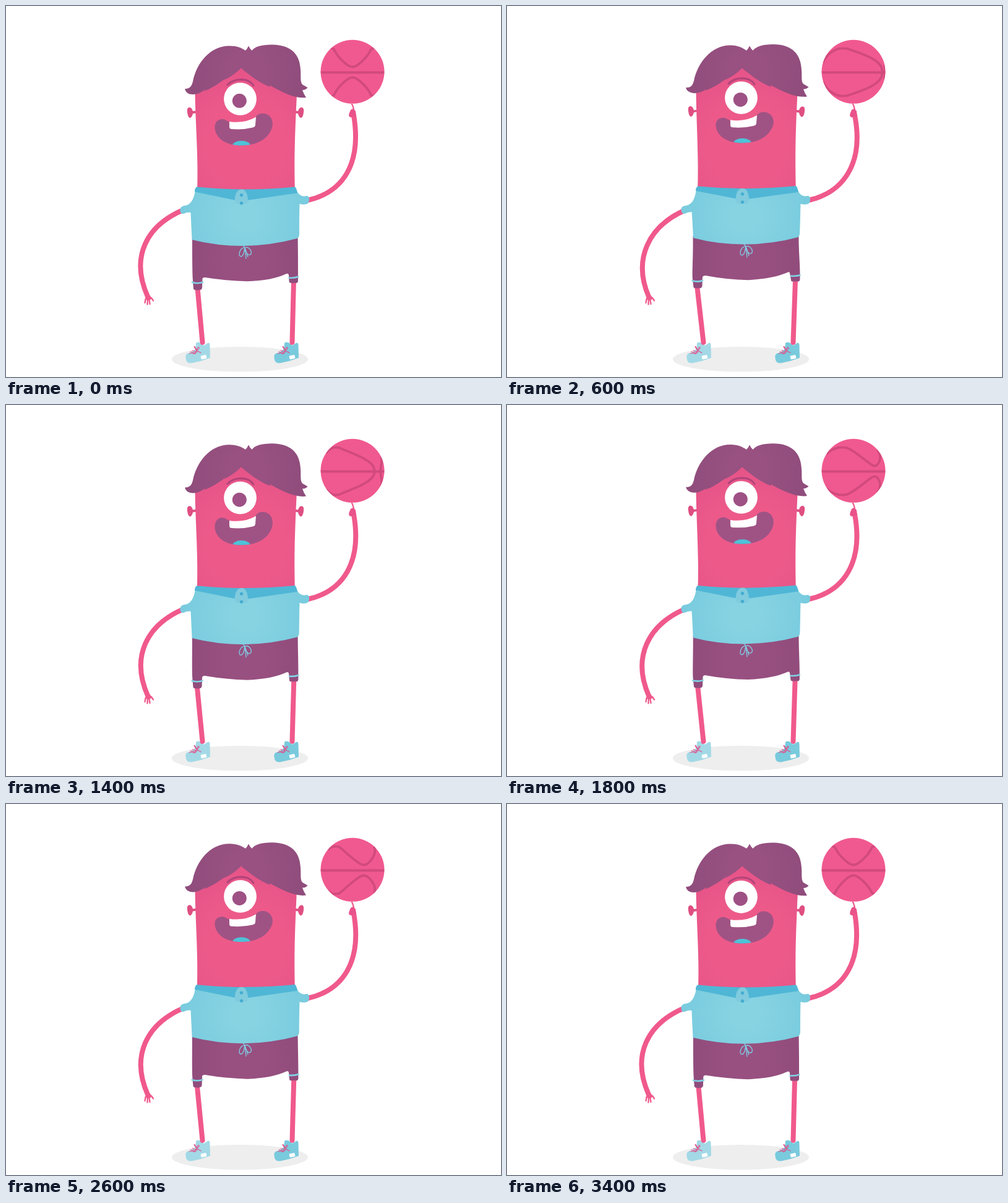
Write an HTML page that moves like this. It is 800x600 px and loops after 3.5 s.

```html
<!DOCTYPE html>
<html lang="en">
<head>
<meta charset="utf-8">
<title>Ball spinner</title>
<style>
  html, body { margin: 0; width: 100%; height: 100%; overflow: hidden; background: #fff; }
  svg { display: block; width: 100%; height: 100%; }
  .limb { fill: none; stroke: #f0598c; stroke-width: 8; stroke-linecap: round; }
  .finger { fill: none; stroke: #f0598c; stroke-width: 2.3; stroke-linecap: round; stroke-linejoin: round; }
  .seam { fill: none; stroke: #d14a7d; stroke-width: 3.8; stroke-linejoin: round; }
  .trim { fill: none; stroke: #80d3e5; stroke-width: 2.6; }
  .lace { fill: none; stroke: #e2508a; stroke-width: 1.2; stroke-linecap: round; }
</style>
</head>
<body>
<!-- In data-d, "a|b" blends from the low pose to the high pose. -->
<svg viewBox="0 0 800 600">
  <defs>
    <radialGradient id="skin" gradientUnits="userSpaceOnUse" cx="388" cy="225" r="125">
      <stop offset="0.45" stop-color="#ed5a8a"/><stop offset="1" stop-color="#e65488"/>
    </radialGradient>
    <radialGradient id="hair" gradientUnits="userSpaceOnUse" cx="388" cy="105" r="105">
      <stop offset="0.3" stop-color="#985181"/><stop offset="1" stop-color="#8e4c7b"/>
    </radialGradient>
    <radialGradient id="shirt" gradientUnits="userSpaceOnUse" cx="386" cy="340" r="105">
      <stop offset="0.2" stop-color="#87d3e2"/><stop offset="1" stop-color="#78cbde"/>
    </radialGradient>
    <radialGradient id="shorts" gradientUnits="userSpaceOnUse" cx="386" cy="412" r="105">
      <stop offset="0.3" stop-color="#985080"/><stop offset="1" stop-color="#8f4b7b"/>
    </radialGradient>
    <clipPath id="ballClip"><circle cx="560" cy="106.3" r="51.3"/></clipPath>
    <clipPath id="mouthClip"><path id="mouthEdge"/></clipPath>
    <path id="shoe" d="M307 545Q311 542 316 546L320 549L326 545Q329 544 329.5 548L330 569Q315 575 300 577.5Q292 578 291 572Q289 564 293 562Q302 560 305.500 555Q307 550 307 545Z"/>
    <g id="shoeTrim">
      <path class="lace" d="M296 562L304 561M298 559L307 562M301 557L309 560M308 557C301 548 305 549 308 557C310 548 316 553 308 557L315 561M308 557Q306 562 303 563"/>
      <rect x="315" y="565" width="9" height="6" rx="1" fill="#fff" transform="rotate(-12 319 568)"/>
    </g>
  </defs>

  <ellipse cx="378" cy="571.3" rx="110" ry="20.3" fill="#eee"/>

  <use href="#shoe" fill="#a3d9e6"/>
  <use href="#shoe" x="143" fill="#79cadd"/>
  <path class="limb" data-d="M309.500|307.500 456L317.500 544"/>
  <path class="limb" data-d="M465|466 444L462.500 544"/>
  <use href="#shoeTrim"/>
  <use href="#shoeTrim" x="143"/>

  <path class="limb" data-d="M286 330|331C228|229 355|357 200|203 405|409 229 470"/>
  <path class="finger" d="M229 470L225.500 474L224.500 480M229 472L228.500 482.500M231 472L232.500 482M231 470L235 472L238 476.500"/>
  <path d="M225 474L227 468L233 468L235 474Q230 478 225 474Z" fill="#f0598c"/>
  <path class="limb" data-d="M488 314C545 301 575|577 255|253 562 177"/>
  <path class="finger" d="M562.500 173Q562 164 559 158.500"/>
  <path d="M557 168Q561 164 565 170L566 178L558 180Q553 180 554.500 174Z" fill="#e9528a"/>

  <circle cx="560" cy="106.300" r="51.500" fill="#f0598f"/>
  <g clip-path="url(#ballClip)">
    <path class="seam" d="M508 107.500H612"/>
    <path class="seam" id="seams"/>
  </g>

  <path fill="url(#shorts)" data-d="M301|300.500 376|372C301 405 301|299 430 302|300 445|442L303|301.500 457.500|455Q304|302 459.500|456.500 309 459.500|456.500Q316.500|315 460|457 317|315.500 456|453L317.500|316 441|438Q318 438.500|435.500 322|321 439|436Q355 444.500|442.500 390 445.300|443.200Q430 444|441 452|453 433.500|431Q456|457 431.500|429 457 435|432L457.500|459 445|443Q457.500|459 448|445.500 461 448|445.500H469|470.500Q472|473.500 448|445.500 472|473.500 444|441C472|474 420 472|471 395 471.500 371|367Z"/>
  <path class="trim" data-d="M300|298.500 446.500|444Q309 450|447.500 319|317 446.500|443.500"/>
  <path class="trim" data-d="M456.500|458 439.500|436.500Q466 440.500|437.500 473|474.500 437.500|435"/>
  <g fill="none" stroke="#80cfe4" stroke-width="1.300">
    <path data-d="M386 391|389C379 390|388 374 403|401 379 405|403C384 406|404 385 395|393 386 391|389C393 388|386 399 398|396 395 402|400C390 405|403 387 396|394 386 391|389L383 387|385M386 391|389L388 409|407M386 391|389L391 406|404"/>
  </g>

  <path fill="#df4f82" data-d="M309 169|167.500L302 170|168.500Q300 163|161 295.500 164|162Q292 165|163 293 172|170Q294 181|179 298 181|179Q301 179|177 302 174|172L309 173|171Z"/>
  <path fill="#df4f82" data-d="M465 169|167.500L472 170|168.500Q474 163|161.500 478.500 164|162.500Q482 165|163.500 481 172|170.500Q480 181|179.500 476 181|179.500Q473 179|177.500 472 174|172.500L465 173|171.500Z"/>

  <path fill="url(#skin)" data-d="M305.500 138|136C306 190 311|310 240 309|308 300L467 300C465 240 468|467 190 470|469.500 142|140L440 122L380 90L325 120Z"/>

  <g fill="url(#hair)">
    <path data-d="M289 134|132C297 134|132 300 130|129 302 122|121C308 92 330 64.500|63.500 361 64.500|63.500C374 64.500|63.500 381 68 387 72Q390 69 392 64.500Q394 69 397.500 72C402 66 412 62.500|62 430 62.500|62C463 63|62 475 80 476 103C477 113 475 122 479 127|126L487.500 132|131Q484 136|134.500 479 136|134.500Q481 142|141 485 148|146.500C470 150|148.500 452 143|142 426 128L427 131C411 125 396 114 380 100.500C371 109 363 115 352 120L355 117C343 126 334 132 320 138|137L323 134C315 140|139 309 143|141 302 143|141Q291 143|140 289 134|132Z"/>
  </g>

  <g id="eye">
    <path d="M358 127.500Q366 119 380 118.800Q394 119 400 128.500" fill="none" stroke="#b3447a" stroke-width="3.200" stroke-linecap="round"/>
    <circle cx="378.500" cy="150.300" r="26.400" fill="#fff"/>
    <circle cx="377.300" cy="153.300" r="11.500" fill="#9e5184"/>
  </g>

  <g clip-path="url(#mouthClip)">
    <rect x="330" y="160" width="110" height="75" fill="#9f5384"/>
    <ellipse id="tongue" cx="380.500" rx="14.500" ry="8" fill="#4ec2d8"/>
  </g>
  <path id="tooth" d="M361 187Q385 190.500 404 179.500L403 192Q403 195.500 399 196.500Q383 200.500 364.500 199Q361 199 361 195Z" fill="#fff"/>

  <path fill="url(#shirt)" data-d="M306 297|296C304 312 299 322 288 323Q281 324 281.500 331|330Q282 337|336 287 336Q293 333 298.500 334|333C299|300 350 300|300.500 365 300.500|301 378|375Q340 388|385.500 384 388|385.500Q430 387|385 470 376|374Q474|473 375|372 474|473 368C474 350 474 335 474.500 320Q481 322 487 320Q490 318 490 313Q490 307 486 307Q475 310 470 299|298Z"/>
  <path fill="#50b6d6" data-d="M308.500 292.500|291.500Q388 300.500|299 467 292.500|291Q469 293|291.500 471 302.500|301L391 314|312L381 302L370 314|311.500L305 300.500|299Q305 294|293 308.500 292.500|291.500Z"/>
  <path fill="#80cbde" data-d="M369.500 315|313C370 303|301 374 296.500|295 381 296.500|295C387 296.500|295 390 303|301 391.500 315|313L389 320H372Z"/>
  <g id="buttons" fill="#43acd0">
    <circle cx="380.500" cy="305.800" r="2.600"/><circle cx="380.500" cy="318.800" r="2.600"/>
  </g>
</svg>

<script>
const LOOP = 3500, STEP = 100, SPIN = 850, TALK = 1700;
const TAU = Math.PI * 2;
const $ = id => document.getElementById(id);
const shapes = [...document.querySelectorAll('[data-d]')].map(el => [el, el.dataset.d]);

// [time, body height from low 0 to high 1]
const LIFT = [[0, 0], [600, 1], [1500, 0.28], [2050, 0.85], [2900, 0.08], [3500, 0.06]];

function liftAt(t) {
  const i = LIFT.findIndex(k => k[0] > t);
  const [t0, a] = LIFT[i - 1], [t1, b] = LIFT[i];
  return a + (b - a) * (1 - Math.cos(Math.PI * (t - t0) / (t1 - t0))) / 2;
}

const blend = (d, h) => d.replace(/([\d.]+)\|([\d.]+)/g, (_, a, b) => (+a + (b - a) * h).toFixed(2));

// Height of the seam on a unit ball, by longitude from its open neck.
const SEAM_END = Math.PI - 0.149;
function seamHeight(lon) {
  const a = Math.abs(lon), turn = 1.5;
  if (a < turn) return Math.hypot(0.165, 0.725 * Math.sin(Math.min(a / 1.2, 1) * Math.PI / 2));
  const d = Math.min((a - turn) / (SEAM_END - turn), 1);
  return 0.743 * Math.sqrt(1 - d ** 1.15);
}

function seamPath(turn) {
  const R = 51.5, N = 140;
  let d = '';
  for (const side of [-1, 1]) {
    let pen = 'M';
    for (let i = 0; i <= N; i++) {
      const lon = SEAM_END * (2 * i / N - 1), s = seamHeight(lon);
      if (Math.cos(lon + turn) < -0.03) { pen = 'M'; continue; }
      const x = 560 + R * Math.sqrt(1 - s * s) * Math.sin(lon + turn);
      d += pen + x.toFixed(1) + ' ' + (107 + side * R * s).toFixed(1);
      pen = 'L';
    }
  }
  return d;
}

function mouthPath(top, low) {
  return `M348 ${top + 9}C355 ${top + 8} 357 ${top + 14} 368 ${top + 15}
    C384 ${top + 17} 400 ${top + 12} 404 ${top + 5}C408 ${top - 2} 421 ${top - 2} 427 ${top + 5}
    C434 ${top + 14} 431 ${low - 25} 422 ${low - 15}C412 ${low - 4} 396 ${low} 380 ${low}
    C357 ${low} 344 ${low - 9} 339 ${low - 21}C335 ${low - 32} 339 ${top + 10} 348 ${top + 9}Z`;
}

const shift = (id, y) => $(id).setAttribute('transform', `translate(0 ${y.toFixed(2)})`);

function draw(t) {
  const h = liftAt(t);
  for (const [el, d] of shapes) el.setAttribute('d', blend(d, h));

  const talk = Math.cos(TAU * (t / TALK - 0.85));
  const low = 224 + 2.6 * talk;
  $('mouthEdge').setAttribute('d', mouthPath(174 - 2.2 * h, low));
  $('tongue').setAttribute('cy', low + 0.5);
  shift('tooth', -1.2 * h + 0.9 * (talk - 0.6));
  shift('eye', -1.1 * h + 0.5 * (talk - 0.6));
  shift('buttons', -1.8 * h);

  $('seams').setAttribute('d', seamPath(TAU * t / SPIN));
}

const start = performance.now();
function tick() {
  const t = (performance.now() - start + 5) % LOOP;
  draw(Math.floor(t / STEP) * STEP);
  requestAnimationFrame(tick);
}
tick();
</script>
</body>
</html>
```
